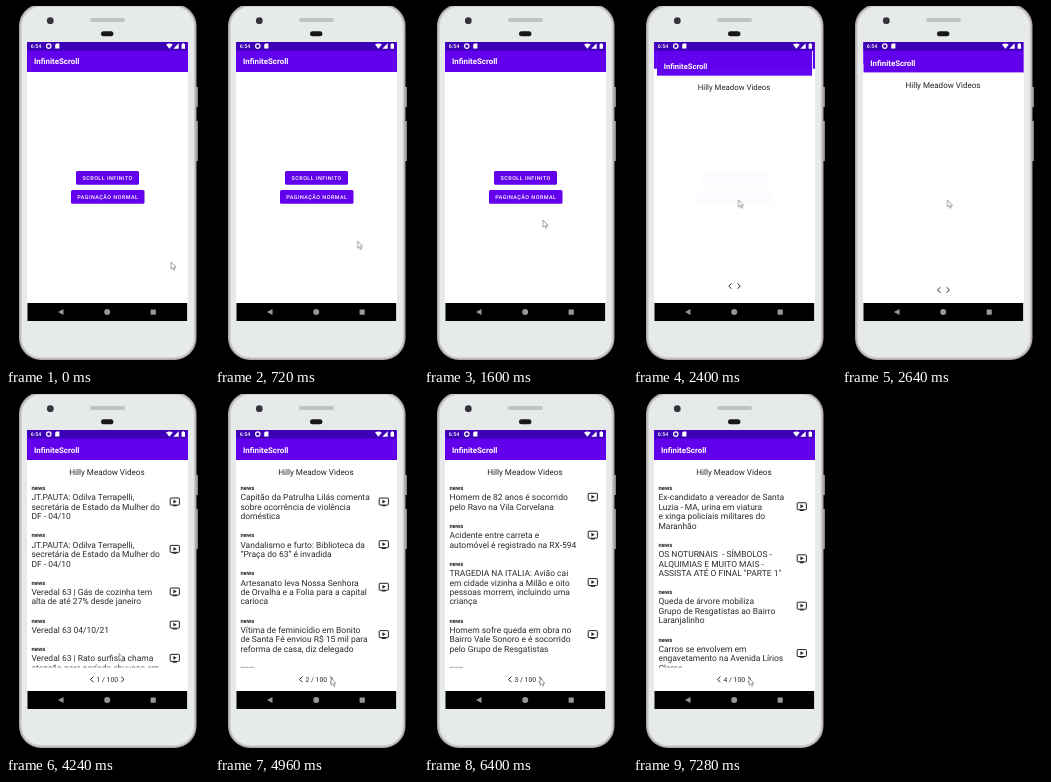
These frames come from a looping animation (203x360 px, 8000 ms). An HTML page:

```html
<!DOCTYPE html>
<html lang="pt">
<head>
<meta charset="utf-8">
<title>InfiniteScroll</title>
<style>
  html, body { margin: 0; width: 100%; height: 100%; overflow: hidden; background: #000; }
  svg { display: block; width: 100vw; height: 100vh; font-family: Roboto, sans-serif; text-rendering: geometricPrecision; }
  .bar { font-size: 7.9px; font-weight: 600; fill: #fff; }
  .btn { font-size: 5.4px; font-weight: 500; letter-spacing: .48px; fill: #fff; text-anchor: middle; }
  .heading { font-size: 8.1px; fill: #222; text-anchor: middle; }
  .tag { font-size: 5.9px; font-weight: 700; fill: #222; }
  .line { font-size: 8.48px; fill: #2b2b2b; white-space: pre; }
  .count { font-size: 6.8px; fill: #222; text-anchor: middle; }
  .arrow { fill: none; stroke: #222; stroke-width: 1; }
  .window { transform-origin: 101.5px 166px; }

  #home { animation: leave 8s infinite; }
  #list { animation: enter 8s infinite; }
  #ripple { animation: ripple 8s infinite; }
  #cursor { animation: move 8s linear infinite; }
  .page { visibility: hidden; animation: 8s step-end infinite; }
  #p0 { animation-name: show0; }
  #p1 { animation-name: show1; }
  #p2 { animation-name: show2; }
  #p3 { animation-name: show3; }
  #p4 { animation-name: show4; }

  @keyframes leave {
    0%, 28.5% { transform: none; visibility: visible; animation-timing-function: ease-out; }
    34% { transform: scale(1.08); visibility: visible; }
    34.1%, 100% { transform: none; visibility: hidden; }
  }
  @keyframes enter {
    0%, 28.4% { opacity: 0; transform: scale(.86); }
    28.5% { opacity: 0; transform: scale(.86); animation-timing-function: cubic-bezier(.1, .7, .3, 1); }
    30.5% { opacity: 1; transform: scale(.965); animation-timing-function: ease-out; }
    34%, 100% { opacity: 1; transform: none; }
  }
  @keyframes ripple {
    0%, 25% { r: 0; opacity: .3; }
    28% { r: 50px; opacity: .3; }
    31%, 100% { r: 50px; opacity: 0; }
  }
  @keyframes move {
    0%, 1% { transform: translate(165px, 256px); }
    11% { transform: translate(137px, 230px); }
    20%, 21% { transform: translate(119px, 214px); }
    24%, 33% { transform: translate(105.5px, 194px); }
    38%, 45% { transform: translate(105px, 193.5px); }
    56%, 100% { transform: translate(116px, 284px); }
  }
  @keyframes show0 { 0% { visibility: inherit; } 38%, 100% { visibility: hidden; } }
  @keyframes show1 { 0% { visibility: hidden; } 38% { visibility: visible; } 60%, 100% { visibility: hidden; } }
  @keyframes show2 { 0% { visibility: hidden; } 60% { visibility: visible; } 74%, 100% { visibility: hidden; } }
  @keyframes show3 { 0% { visibility: hidden; } 74% { visibility: visible; } 90%, 100% { visibility: hidden; } }
  @keyframes show4 { 0% { visibility: hidden; } 90%, 100% { visibility: visible; } }
</style>
</head>
<body>
<svg viewBox="0 0 203 360" preserveAspectRatio="none">
  <defs>
    <clipPath id="screen"><rect x="21.5" y="36" width="159.6" height="261"/></clipPath>
    <clipPath id="rows"><rect x="22" y="86" width="159" height="187.5"/></clipPath>
    <clipPath id="face"><rect x="65" y="184" width="73.5" height="13.8" rx="1.5"/></clipPath>
    <g id="video">
      <rect x="-4.6" y="-4.1" width="9.2" height="7" rx=".7" fill="none" stroke="#222" stroke-width="1"/>
      <path d="M-1.4-2.5 2-.6-1.4 1.3zM-2 2.9H2V4.2H-2z" fill="#222"/>
    </g>
  </defs>

  <rect width="203" height="360"/>
  <path d="M190 81h1.8v20H190zM190 115h1.8v40H190z" fill="#a9a9ac"/>
  <rect x="13" y="-2" width="177.5" height="356" rx="22" fill="#aaa4a7"/>
  <rect x="14.2" y="-.8" width="175.1" height="353.6" rx="21" fill="#cfcbcd"/>
  <rect x="15.7" y=".7" width="172.1" height="350.6" rx="19.5" fill="#e7eaea"/>
  <rect x="84" y="12" width="35" height="4" rx="2" fill="#c0c2c3"/>
  <circle cx="44.3" cy="14.7" r="3.4" fill="#34343a"/>
  <rect x="95" y="25.3" width="12.4" height="5" rx="2.5" fill="#17171a"/>

  <rect x="21.5" y="36" width="159.6" height="279"/>
  <g clip-path="url(#screen)">
    <g id="home" class="window">
      <rect x="21" y="36" width="161" height="261" fill="#fff"/>
      <rect x="21" y="36" width="161" height="30" fill="#6200ee"/>
      <text class="bar" x="28" y="58.4">InfiniteScroll</text>
      <rect x="70" y="165" width="63" height="13.8" rx="1.5" fill="#6200ee"/>
      <rect x="65" y="184" width="73.5" height="13.8" rx="1.5" fill="#6200ee"/>
      <g clip-path="url(#face)"><circle id="ripple" cx="106" cy="194" r="0" fill="#fff"/></g>
      <text class="btn" x="101.7" y="173.9">SCROLL INFINITO</text>
      <text class="btn" x="101.9" y="192.9">PAGINAÇÃO NORMAL</text>
    </g>
    <g id="list" class="window">
      <rect x="21" y="36" width="161" height="261" fill="#fff"/>
      <rect x="21" y="36" width="161" height="30" fill="#6200ee"/>
      <text class="bar" x="28" y="59.4">InfiniteScroll</text>
      <text class="heading" x="101" y="81.2">Hilly Meadow Videos</text>
      <g id="p0" class="page">
        <path class="arrow" d="M98.4 281.6 95.6 284.4 98.4 287.2M104.6 281.6 107.4 284.4 104.6 287.2"/>
      </g>
      <g id="pages"></g>
    </g>
  </g>

  <rect x="21.5" y="36" width="159.6" height="8.7" fill="#3d00b6"/>
  <g fill="#fff">
    <text x="24.8" y="42.1" font-size="5.3" font-weight="500">6:54</text>
    <circle cx="42.8" cy="40.1" r="2.2" fill="none" stroke="#fff" stroke-width="1.2"/>
    <path d="M50.3 37.6h3.1v5h-4.2v-3.8z"/>
    <path d="M160 38.5q3.4-2.2 6.8 0l-3.4 4.3zM172.7 37.3v5.4h-5.4zM175.6 38h.9v-.8h1.6v.8h.9v4.8h-3.4z"/>
  </g>
  <g fill="#989898">
    <path d="M52 306l5.5-3.1v6.2z"/>
    <circle cx="101.2" cy="306" r="3"/>
    <rect x="144.6" y="303.5" width="5.2" height="5.2" rx=".4"/>
  </g>
  <path id="cursor" d="M0 0V7.2L1.6 5.7 2.8 8.2 4 7.6 2.9 5.3H5z" fill="#fff" stroke="#666" stroke-width=".6"/>
</svg>

<script>
  const pages = [
    [
      "JT.PAUTA: Odilva Terrapelli,\nsecretária de Estado da Mulher do\nDF - 04/10",
      "JT.PAUTA: Odilva Terrapelli,\nsecretária de Estado da Mulher do\nDF - 04/10",
      "Veredal 63 | Gás de cozinha tem\nalta de até 27% desde janeiro",
      "Veredal 63 04/10/21",
      "Veredal 63 | Rato surfista chama\natenção para período chuvoso em"
    ],
    [
      "Capitão da Patrulha Lilás comenta\nsobre ocorrência de violência\ndoméstica",
      "Vandalismo e furto: Biblioteca da\n“Praça do 63” é invadida",
      "Artesanato leva Nossa Senhora\nde Orvalha e a Folia para a capital\ncarioca",
      "Vítima de feminicídio em Bonito\nde Santa Fé enviou R$ 15 mil para\nreforma de casa, diz delegado",
      ""
    ],
    [
      "Homem de 82 anos é socorrido\npelo Ravo na Vila Corvelana",
      "Acidente entre carreta e\nautomóvel é registrado na RX-594",
      "TRAGEDIA NA ITALIA: Avião cai\nem cidade vizinha a Milão e oito\npessoas morrem, incluindo uma\ncriança",
      "Homem sofre queda em obra no\nBairro Vale Sonoro e é socorrido\npelo Grupo de Resgatistas",
      ""
    ],
    [
      "Ex-candidato a vereador de Santa\nLuzia - MA, urina em viatura\ne xinga policiais militares do\nMaranhão",
      "OS NOTURNAIS  - SÍMBOLOS -\nALQUIMIAS E MUITO MAIS -\nASSISTA ATÉ O FINAL \"PARTE 1\"",
      "Queda de árvore mobiliza\nGrupo de Resgatistas ao Bairro\nLaranjalinho",
      "Carros se envolvem em\nengavetamento na Avenida Lírios\nClaros"
    ]
  ];

  const LINE = 9.45, GAP = 19;
  // Vertical positions are text centres; drop moves them to the baseline.
  const text = (cls, x, y, s, drop) => `<text class="${cls}" x="${x}" y="${y + drop}">${s}</text>`;

  function rows(items) {
    let y = 103.4, out = "";
    for (const item of items) {
      const lines = item.split("\n");
      out += text("tag", 25.5, y - 9.4, "news", 2);
      lines.forEach((s, i) => out += text("line", 25.4, y + i * LINE, s, 2.9));
      if (item) out += `<use href="#video" x="168.8" y="${y + (lines.length - 2) * LINE / 2}"/>`;
      y += GAP + lines.length * LINE;
    }
    return out;
  }

  document.getElementById("pages").innerHTML = pages.map((items, i) => `
    <g id="p${i + 1}" class="page">
      <g clip-path="url(#rows)">${rows(items)}</g>
      ${text("count", 101.3, 285.6, `${i + 1} / 100`, 2.4)}
      <path class="arrow" d="M87.4 282.6 84.6 285.4 87.4 288.2M115.2 282.6 118 285.4 115.2 288.2"/>
    </g>`).join("");
</script>
</body>
</html>
```
